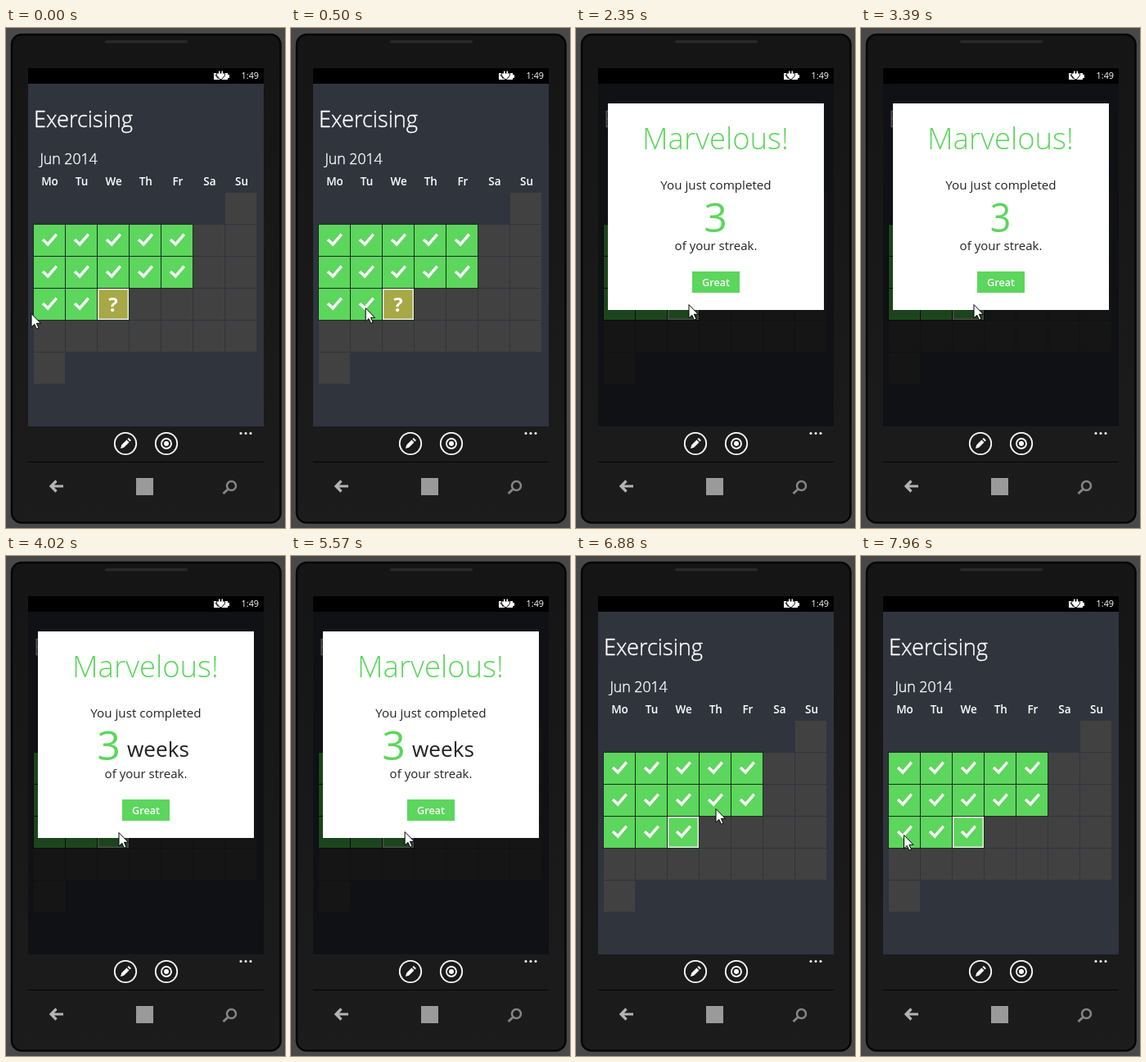
Write an HTML page that moves like this. It is 341 px wide and 610 px high and loops after 8000 ms.

```html
<!DOCTYPE html>
<html lang="en">
<head>
<meta charset="utf-8">
<title>Exercise calendar</title>
<style>
  html, body { margin: 0; width: 100%; height: 100%; overflow: hidden; background: #484848; }
  svg { display: block; width: 100%; height: 100%; font-family: "Open Sans", "Noto Sans", sans-serif; fill: #fff; }
  .light { font-weight: 300; }
  .heading { font-weight: 300; stroke: #fff; stroke-width: .4; }
  .semi { font-weight: 600; }
  .mid { text-anchor: middle; }
  .line { fill: none; stroke: #fff; stroke-width: 1.8; }
  .dark { fill: #222; }
  .green { fill: #5cd65c; }
</style>
</head>
<body>
<svg viewBox="0 0 341 610">
  <defs>
    <linearGradient id="body" x2="0" y2="1">
      <stop offset="0" stop-color="#151515"/>
      <stop offset="1" stop-color="#1c1c1c"/>
    </linearGradient>
  </defs>

  <!-- Phone -->
  <rect width="341" height="610" fill="#484848"/>
  <rect x="7" y="8" width="328.500" height="595.500" rx="12" fill="url(#body)" stroke="#060606" stroke-width="2.500"/>
  <rect x="121" y="15" width="101" height="3.500" rx="1.700" fill="#292929"/>
  <rect x="27" y="49" width="288" height="19" fill="#000"/>
  <rect x="27" y="68" width="288" height="418" fill="#30343d"/>
  <rect x="27" y="486" width="288" height="43" fill="#1b1b1b"/>
  <rect x="27" y="529" width="288" height="1" fill="#050505"/>

  <!-- Status bar -->
  <path d="M254 55h17v2h2v4h-2v2h-17z"/>
  <path d="M255.500 56.500l4 5.500" stroke="#000"/>
  <path d="M260 52.500h1.500v3h2v-3h1.500v3h2v2.500l-3.500 4h-2l-3.500-4v-2.500h2z" stroke="#000" paint-order="stroke" stroke-width="1.600"/>
  <text x="309" y="62" font-size="10.800" text-anchor="end">1:49</text>

  <!-- Calendar -->
  <text class="heading" x="34" y="121" font-size="27.200">Exercising</text>
  <text class="heading" x="41.500" y="166" font-size="17.700">Jun 2014</text>
  <g id="weekdays" class="semi mid" font-size="13.500"></g>
  <g id="cells"></g>
  <g id="asking">
    <rect x="112" y="318" width="38" height="38" fill="#a7a846"/>
    <text class="mid" x="131" y="346" font-size="24" font-weight="700">?</text>
  </g>
  <rect x="112.700" y="318.700" width="36.600" height="36.600" fill="none" stroke="#eef2e8" stroke-width="1.400"/>

  <!-- Popup -->
  <g id="popup">
    <rect x="27" y="68" width="288" height="418" fill="#000" opacity=".68"/>
    <rect x="39" y="92" width="264" height="252"/>
    <g class="mid">
      <text class="light green" x="170.500" y="148" font-size="36.500">Marvelous!</text>
      <text class="dark" x="171" y="197" font-size="15.200">You just completed</text>
      <text class="dark" x="171" y="271" font-size="15">of your streak.</text>
      <text id="count" class="green" y="249" font-size="50">3</text>
      <rect class="green" x="142" y="297" width="58" height="26"/>
      <text class="semi" x="171" y="315" font-size="12.600">Great</text>
    </g>
    <text id="unit" class="dark" x="148" y="245" font-size="26.200">weeks</text>
  </g>

  <!-- App bar -->
  <g class="line">
    <circle cx="146" cy="507" r="13.200"/>
    <circle cx="196" cy="507" r="13.200"/>
    <circle cx="196" cy="507" r="6"/>
  </g>
  <circle cx="196" cy="507" r="3"/>
  <path d="M140 513l1.200-4.200 6.300-6.300 3 3-6.300 6.300zM148.500 501.500l1.400-1.400 3 3-1.400 1.400z"/>
  <circle cx="287" cy="494.500" r="1.500"/>
  <circle cx="293" cy="494.500" r="1.500"/>
  <circle cx="299" cy="494.500" r="1.500"/>

  <!-- Hardware keys -->
  <path d="M70 559H55M61.500 552.500L55 559l6.500 6.500" fill="none" stroke="#b4b4b4" stroke-width="3.200"/>
  <rect x="159" y="549" width="21" height="21" fill="#9a9a9a"/>
  <path d="M271.500 562.500L265.500 568" stroke="#858585" stroke-width="3"/>
  <circle cx="275.500" cy="558.500" r="5.500" fill="none" stroke="#858585" stroke-width="2.500"/>

  <path id="cursor" d="M.5.5V17L4.300 13.400 7 19.200 9.500 18.100 6.900 12.300H12z" stroke="#000"/>
</svg>
<script>
const LOOP = 8000, POPUP_OPEN = 2350, POPUP_CLOSE = 6880;
const PITCH = 39, LEFT = 34, TOP = 201, SIZE = 38;
const byId = id => document.getElementById(id);
const [cursor, count, unit, popup, asking] =
  ["cursor", "count", "unit", "popup", "asking"].map(byId);

byId("weekdays").innerHTML = ["Mo", "Tu", "We", "Th", "Fr", "Sa", "Su"]
  .map((day, i) => `<text x="${53.5 + i * 39.1}" y="192">${day}</text>`).join("");

const isDone = (row, col) => (row === 1 || row === 2) && col < 5 || row === 3 && col < 3;

function cell(row, col) {
  const x = LEFT + col * PITCH, y = TOP + row * PITCH;
  const square = `x="${x}" y="${y}" width="${SIZE}" height="${SIZE}"`;
  if (!isDone(row, col)) return `<rect ${square} fill="#414141"/>`;
  return `<rect ${square} class="green" stroke="#1c2a22" stroke-width="2" paint-order="stroke"/>
    <path class="line" style="stroke-width:3.5" d="M${x + 11} ${y + 18}l6.200 6 10.500-12.300"/>`;
}
let cells = "";
for (let day = 6; day < 36; day++) cells += cell(Math.floor(day / 7), day % 7);
byId("cells").innerHTML = cells;

// Progress 0..1 in a number of held steps; the first falls on start, the last on end.
function stepped(t, start, end, steps) {
  if (t < start) return 0;
  if (t >= end) return 1;
  return (Math.floor((t - start) / (end - start) * (steps - 1)) + 1) / steps;
}
const smooth = p => p * p * (3 - 2 * p);
const mix = (a, b, p) => a + (b - a) * p;

const moves = [
  { start: 60, end: 830, steps: 12, to: [127, 337] },
  { start: 890, end: 1010, steps: 3, to: [137.5, 337] },
  { start: 5570, end: 6130, steps: 9, to: [170.5, 308] },
  { start: 7870, end: 7960, steps: 2, to: [52, 340] },
];

function cursorAt(t) {
  let [x, y] = [30.5, 348];
  for (const { start, end, steps, to } of moves) {
    const p = smooth(stepped(t, start, end, steps));
    x = mix(x, to[0], p);
    y = mix(y, to[1], p);
  }
  return [x, y];
}

function draw(t) {
  const [x, y] = cursorAt(t);
  cursor.setAttribute("transform", `translate(${x} ${y})`);
  popup.style.display = t >= POPUP_OPEN && t < POPUP_CLOSE ? "" : "none";
  asking.style.display = t < POPUP_OPEN ? "" : "none";

  const turn = Math.cos(2 * Math.PI * smooth(stepped(t, 2750, 3510, 12)));
  const slide = smooth(stepped(t, 3600, 4020, 7));
  count.setAttribute("transform", `translate(${mix(170.5, 125.5, slide)} 0) scale(${turn} 1)`);
  unit.setAttribute("opacity", slide);
}

function frame() {
  draw(performance.now() % LOOP);
  requestAnimationFrame(frame);
}
frame();
</script>
</body>
</html>
```
